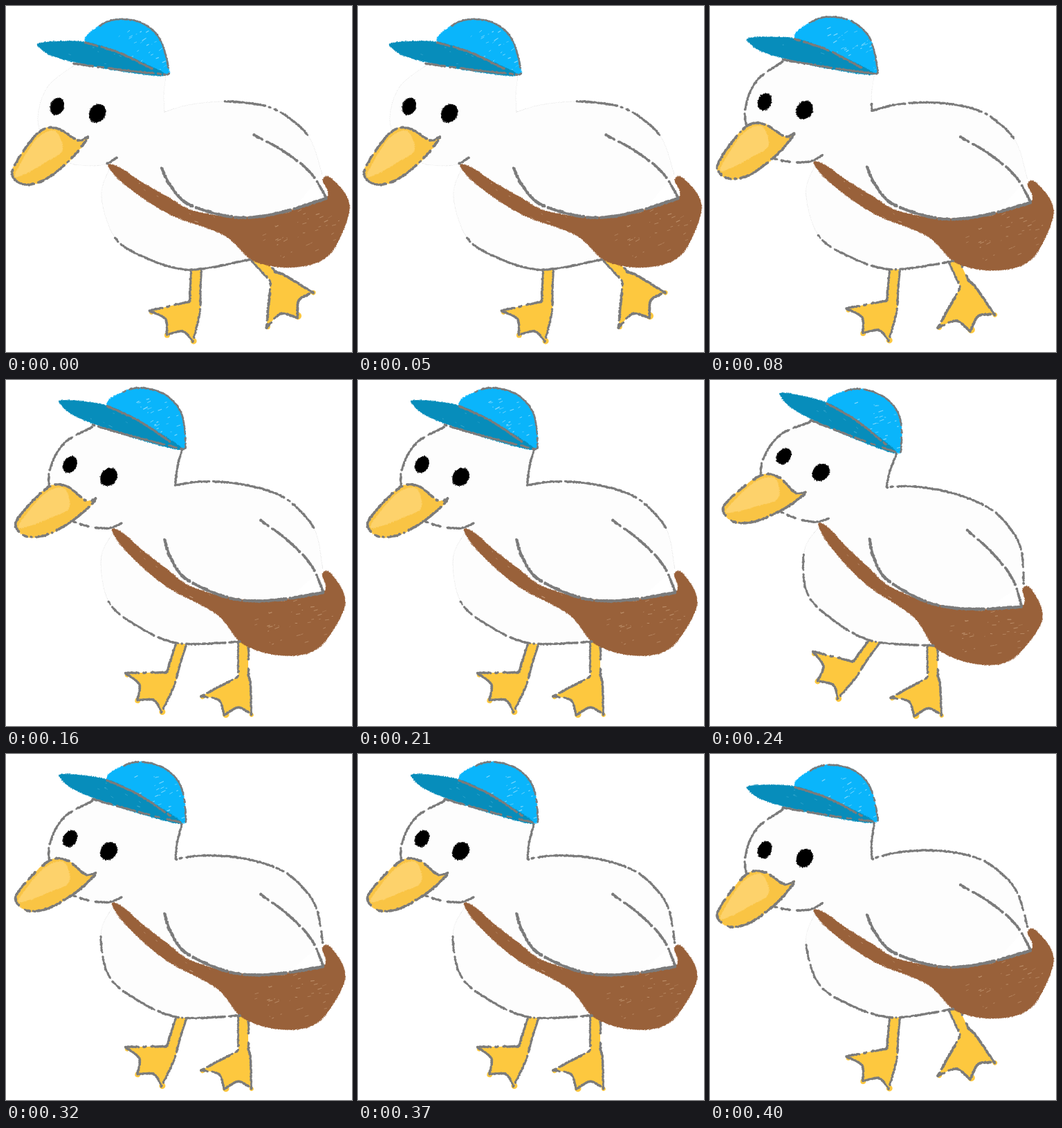
Write an HTML page with a canvas that moves like this. It is 500 px wide and 500 px high and loops after 0.48 s.

```html
<!DOCTYPE html>
<html lang="en">
<head>
<meta charset="utf-8">
<title>Walking duck</title>
<style>
html, body { margin: 0; width: 100%; height: 100%; overflow: hidden; background: #fff; }
canvas { display: block; width: 100vw; height: 100vh; }
</style>
</head>
<body>
<canvas id="stage" width="500" height="500"></canvas>
<script>
const ctx = document.getElementById('stage').getContext('2d');
const STEP = 80;
const CYCLE = [0, 1, 2, 3, 2, 1];
const MAX_TILT = 14.4;
const GREY = '#7b7b7b', YELLOW = '#fdc83f', BROWN = '#99613a';

// Body tilt in degrees; ankle x, y and foot turn for each leg.
const POSES = [
  { tilt: 0,        near: [273, 430, 0],  far: [388, 393, -72] },
  { tilt: 1.9,      near: [263, 429, 2],  far: [369, 404, -48] },
  { tilt: 8.2,      near: [239, 427, 12], far: [343, 430, -15] },
  { tilt: MAX_TILT, near: [212, 413, 27], far: [322, 431, -16] }
];

let seed = 1;
function rnd() {
  seed = (seed * 16807) % 2147483647;
  return seed / 2147483647;
}
const spread = a => (rnd() - 0.5) * 2 * a;
const rad = deg => deg * Math.PI / 180;

// Catmull-Rom samples through a flat list of coordinates.
function spline(flat, closed = false) {
  const n = flat.length / 2, out = [];
  const at = i => {
    const k = closed ? (i + n) % n : Math.max(0, Math.min(n - 1, i));
    return [flat[2 * k], flat[2 * k + 1]];
  };
  for (let i = 0; i < (closed ? n : n - 1); i++) {
    const [a, b, c, d] = [at(i - 1), at(i), at(i + 1), at(i + 2)];
    const steps = Math.max(1, Math.ceil(Math.hypot(c[0] - b[0], c[1] - b[1]) / 1.2));
    for (let s = 0; s < steps; s++) {
      const t = s / steps;
      out.push([0, 1].map(k => b[k] + 0.5 * t * (c[k] - a[k] +
        t * (2 * a[k] - 5 * b[k] + 4 * c[k] - d[k] + t * (3 * (b[k] - c[k]) + d[k] - a[k])))));
    }
  }
  if (!closed) out.push(at(n - 1));
  return out;
}

function trace(pts) {
  ctx.beginPath();
  pts.forEach(([x, y]) => ctx.lineTo(x, y));
}

function dots(pts, size, color, rough) {
  ctx.fillStyle = color;
  ctx.beginPath();
  for (const [x, y] of pts) {
    const r = size / 2 * (1 + spread(0.25)), px = x + spread(rough), py = y + spread(rough);
    ctx.moveTo(px + r, py);
    ctx.arc(px, py, r, 0, 7);
  }
  ctx.fill();
}

// Broken crayon line along the part of a curve between two fractions.
function crayon(pts, width = 3.2, from = 0, to = 1) {
  let gap = 0;
  const kept = pts.filter((p, k) => {
    if (rnd() < 0.03) gap = 4;
    return gap-- <= 0 && k >= from * pts.length && k <= to * pts.length;
  });
  dots(kept, width, GREY, 0.5);
}

function fill(pts, color) {
  trace(pts);
  ctx.fillStyle = color;
  ctx.fill();
}

function blob(flat, color) {
  const pts = spline(flat, true);
  fill(pts, color);
  dots(pts, 1.4, color, 0.7);
  return pts;
}

// Short pale scratches inside a shape.
function scratches(shape, [x, y, w, h], count, color, slope) {
  ctx.save();
  trace(shape);
  ctx.clip();
  ctx.strokeStyle = color;
  for (let i = 0; i < count; i++) {
    const px = x + rnd() * w, py = y + rnd() * h, len = 1 + rnd() * 5;
    ctx.lineWidth = 0.4 + rnd() * 0.9;
    ctx.beginPath();
    ctx.moveTo(px, py);
    ctx.lineTo(px + len, py + len * slope + spread(1));
    ctx.stroke();
  }
  ctx.restore();
}

// Three toes fan out from the ankle; the web sags between them.
function foot() {
  const toes = [0, 1, 2].map(k => {
    const a = rad(171 - 39 * k), len = 67 - 6 * k;
    return [len * Math.cos(a), len * Math.sin(a)];
  });
  const sag = (p, q) => [0, 1].map(i => (p[i] + q[i]) / 2 * 0.8);
  const web = k => spline([toes[k], sag(toes[k], toes[k + 1]), toes[k + 1]].flat());
  const sides = [
    spline([-8, -3, ...toes[0]]), web(0), web(1), spline([...toes[2], 7, 14, 8, -2])
  ];
  fill(sides.flat(), YELLOW);
  dots(toes.map(([x, y]) => [x * 0.96, y * 0.96 + 2]), 8, YELLOW, 1);
  sides.forEach(s => crayon(s));
}

function leg([x, y, turn], lean, scale = 1) {
  ctx.save();
  ctx.translate(x, y);
  ctx.save();
  ctx.rotate(rad(lean));
  ctx.fillStyle = YELLOW;
  ctx.fillRect(-7, -55, 14, 57);
  for (const side of [-7.5, 7.5]) crayon(spline([side, -55, side, 0]));
  ctx.restore();
  ctx.rotate(rad(turn));
  ctx.scale(scale, scale);
  foot();
  ctx.restore();
}

function torso() {
  const front = spline([98, 86, 60, 117, 46, 163, 60, 203, 92, 227, 138, 230, 160, 219]);
  const belly = spline([149, 235, 138, 275, 157, 334, 200, 363, 265, 381, 354, 366]);
  const back = spline([231, 100, 228, 128, 229, 153, 229, 153, 268, 142, 322, 138, 376, 145,
    411, 163, 440, 193, 457, 243]);
  fill([...front, ...belly, ...back.reverse()], '#fdfdfd');
  return { front, belly, back: back.reverse() };
}

// The contour is pale at first and fills in over the loop.
function outline({ front, belly, back }, i) {
  for (const curve of [front, belly, back]) dots(curve, 0.7, '#d0d0d0', 0.3);
  crayon(front, 3.2, i ? 0 : 0.92);
  crayon(belly, 3.2, i < 3 ? 0.33 : 0.15);
  crayon(back, 3.2, i ? 0.12 * (i < 2) : 0.42, i < 3 ? 0.82 : 1);
}

function bag() {
  const shape = blob([148, 231, 163, 233, 195, 254, 235, 277, 270, 296, 330, 305, 390, 300, 462, 278,
    458, 252, 468, 248, 492, 275, 494, 305, 467, 359, 420, 377, 360, 369, 315, 331, 235, 300,
    172, 258], BROWN);
  scratches(shape, [370, 290, 120, 75], 40, '#bd906b', -0.4);
  scratches(shape, [175, 240, 150, 80], 16, '#c9a183', 0.5);
}

function wing() {
  crayon(spline([358, 186, 403, 211, 440, 241, 463, 277]), 3.6);
  crayon(spline([225, 234, 238, 260, 265, 287, 330, 305, 390, 300, 463, 278]), 4.1);
}

function beak() {
  const rim = blob([48, 182, 74, 177, 104, 194, 118, 190, 95, 220, 58, 250, 28, 258, 9, 245, 17, 222],
    '#f9c444');
  blob([14, 243, 43, 194, 70, 181, 81, 208, 56, 226, 28, 242], '#fdd26b');
  crayon(rim, 3.4);
}

function eye(x, y, rx, ry) {
  const ring = Array.from({ length: 40 }, (_, k) => {
    const a = k / 40 * 2 * Math.PI, v = ry * Math.sin(a);
    return [x + rx * Math.cos(a) - 0.15 * v, y + v];
  });
  fill(ring, '#000');
  dots(ring, 1.6, '#000', 0.8);
}

function hat() {
  const crown = blob([115, 52, 138, 27, 165, 19, 197, 25, 222, 47, 234, 86, 229, 99, 170, 78], '#0ab5fb');
  scratches(crown, [150, 35, 82, 60], 40, '#83dafd', -0.6);
  const brim = blob([48, 54, 80, 51, 118, 53, 162, 67, 229, 99, 160, 93, 76, 75, 50, 61], '#078dbb');
  scratches(brim, [90, 55, 90, 36], 8, '#3aa9cf', 0.3);
  crayon(spline([115, 53, 162, 67, 212, 91]));
  crayon(spline([98, 83, 164, 92, 230, 99]));
  crayon(crown, 2.6, 0.1, 0.6);
}

function draw(i) {
  const { tilt, near, far } = POSES[CYCLE[i]];
  const k = tilt / MAX_TILT, shift = Math.sqrt(k);
  seed = 4127;
  ctx.fillStyle = '#fff';
  ctx.fillRect(0, 0, 500, 500);
  leg(far, 0.75 * (far[2] + 15), 1 + 0.1 * Math.sin(rad(-2 * (far[2] + 15))));
  leg(near, 2 + 1.25 * near[2]);

  // The body leans forward about the wing root and squashes a little.
  ctx.save();
  ctx.translate(225 + 5.5 * shift, 235 - 4.5 * shift);
  ctx.scale(1, 1 - 0.035 * k * k);
  ctx.rotate(rad(tilt));
  ctx.translate(-225, -235);
  const contour = torso();
  bag();
  wing();
  outline(contour, i);
  beak();
  eye(74, 145, 9.6, 12);
  eye(132, 155, 11.6, 13);
  hat();
  ctx.restore();
}

let shown = -1;
function tick() {
  const i = Math.floor(performance.now() / STEP) % CYCLE.length;
  if (i !== shown) draw(shown = i);
  requestAnimationFrame(tick);
}
tick();
</script>
</body>
</html>
```
